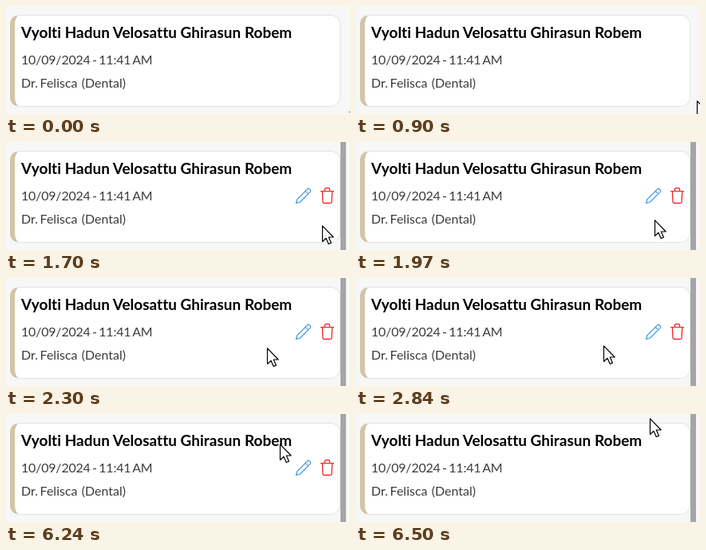
Write an HTML page with a canvas that moves like this. It is 431 px wide and 135 px high and loops after 8 s.

```html
<!DOCTYPE html>
<html lang="en">
<head>
<meta charset="utf-8">
<title>Appointment card</title>
<style>
html, body { margin: 0; width: 100%; height: 100%; overflow: hidden; background: #f7f7f7; }
body { position: relative; font-family: Lato, sans-serif; font-variant-ligatures: none; }
.card {
  position: absolute; left: 5px; top: 11px; width: 414px; height: 115px;
  box-sizing: border-box; background: #fff;
  border: 1px solid #e4e4e4; border-left: 6px solid #d2c4a5; border-radius: 12px;
}
.line { position: absolute; left: 19px; white-space: pre; font-size: 16px; line-height: 20px; color: #3c3c3c; }
.name { top: 23px; font-size: 19px; font-weight: 700; color: #000; }
.date, .doctor { word-spacing: -1.5px; }
.date { top: 57px; letter-spacing: -.2px; }
.doctor { top: 86px; }
canvas { position: absolute; left: 0; top: 0; }
</style>
</head>
<body>
<div class="card"></div>
<div class="line name">Vyolti Hadun Velosattu Ghirasun Robem</div>
<div class="line date">10/09/2024 - 11:41 AM</div>
<div class="line doctor">Dr. Felisca&nbsp; (Dental)</div>
<canvas id="stage" width="431" height="135"></canvas>
<script>
const LOOP = 8000, TICK = 1000 / 15;
const ctx = document.getElementById('stage').getContext('2d');

// Pointer stops: tick, x, y
const stops = [
  [10, 430, 133], [13, 427, 118], [14, 426, 116], [16, 426, 116],
  [21, 417, 111], [29, 374, 97], [34, 327, 87], [36, 327, 87],
  [40, 313, 85], [41, 313, 85], [42, 310, 84], [87, 310, 84],
  [88, 308, 82], [97, 368, 5]
];

const arrow = new Path2D('M.5 .8V20.5L5 16.3L8.2 23.5L11.4 22.1L8.3 15H14.2Z');
const pencil = new Path2D(
  'M363.5 76.5L365 71.5L377.7 58.8Q378.9 57.7 380 58.8L381.2 60Q382.3 61.2 381.2 62.3L368.5 75Z' +
  'M375.2 61.3L378.7 64.8');
const bin = new Path2D(
  'M394.5 61.5H410.5M399.5 61.5V59Q399.5 57.7 400.7 57.7H404.3Q405.5 57.7 405.5 59V61.5' +
  'M396.3 61.5L397 75Q397.1 76.4 398.5 76.4H406.5Q407.9 76.4 408 75L408.7 61.5');

function pointerAt(tick) {
  const i = stops.findIndex(s => s[0] > tick);
  if (i < 0) return stops[stops.length - 1].slice(1);
  const [t0, x0, y0] = stops[i - 1], [t1, x1, y1] = stops[i];
  let p = (tick - t0) / (t1 - t0);
  if (t0 === 29 || t0 === 36) p = 1 - (1 - p) ** 1.5;
  if (t0 === 88) p = p * p * (3 - 2 * p);
  return [Math.round(x0 + (x1 - x0) * p), Math.round(y0 + (y1 - y0) * p)];
}

function strokeIcon(path, color) {
  ctx.strokeStyle = color;
  ctx.lineWidth = 1.2;
  ctx.stroke(path);
}

function drawPointer(x, y) {
  ctx.save();
  ctx.translate(x, y);
  ctx.fillStyle = '#fff';
  ctx.fill(arrow);
  ctx.strokeStyle = '#000';
  ctx.lineWidth = 1.2;
  ctx.stroke(arrow);
  ctx.restore();
}

function draw(time) {
  const tick = Math.floor((time - 30) / TICK);
  ctx.clearRect(0, 0, 431, 135);
  ctx.lineJoin = ctx.lineCap = 'round';

  if (tick >= 14) {
    ctx.fillStyle = '#a5a5a5';
    ctx.fillRect(419, 0, 7, 135);
  }
  if (time < 500) {
    ctx.fillStyle = '#111';
    ctx.fillRect(430, 132, 1, 1);
  }
  if (tick < 10) return;

  const [x, y] = pointerAt(tick);
  if (x < 419 && y >= 11) {
    strokeIcon(pencil, '#3f9be0');
    strokeIcon(bin, '#f5141b');
  }
  drawPointer(x, y);
}

const start = performance.now();
function frame() {
  draw((performance.now() - start) % LOOP);
  requestAnimationFrame(frame);
}
draw(0);
requestAnimationFrame(frame);
</script>
</body>
</html>
```
